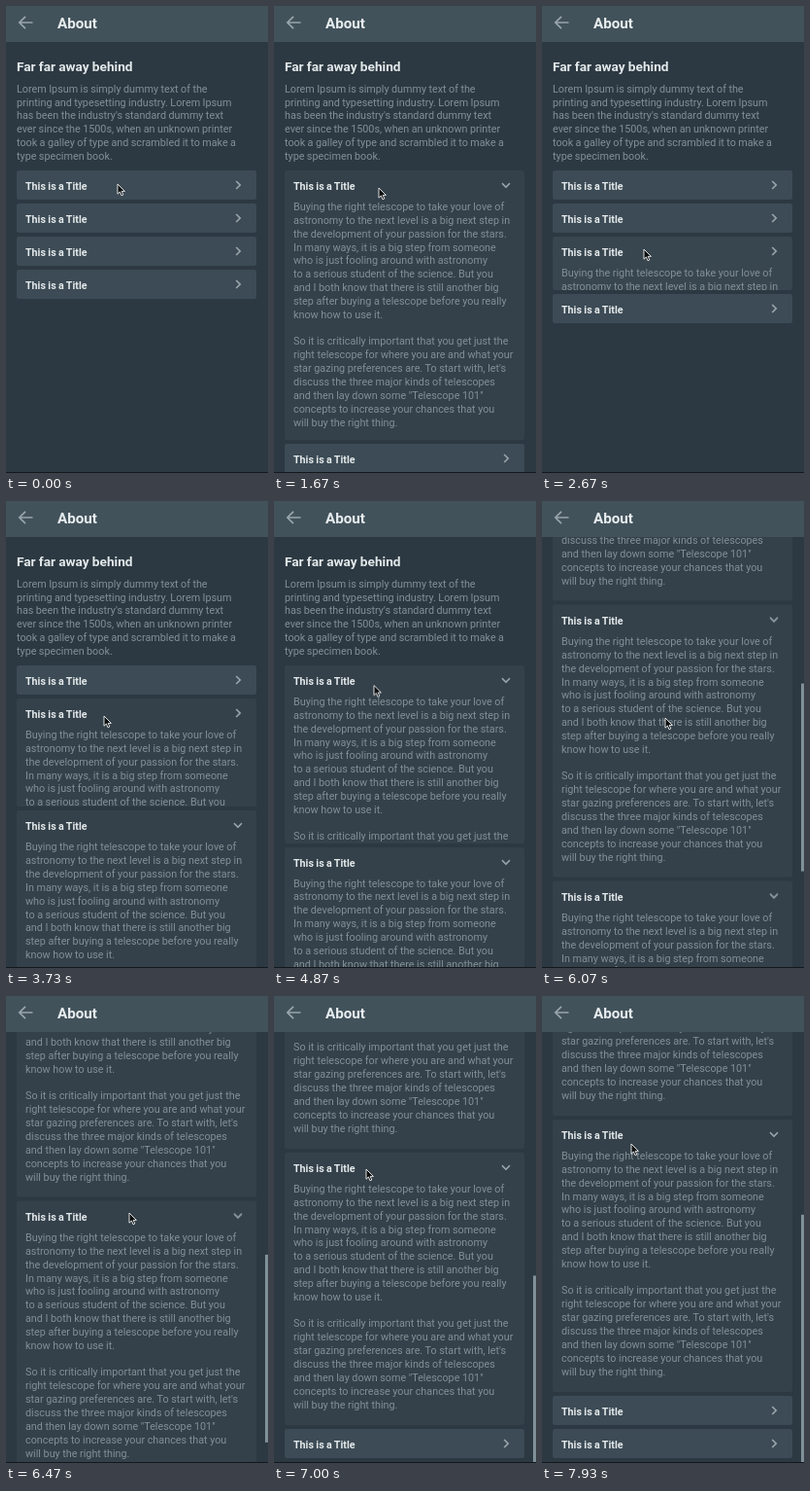
An HTML page for the animation above (8000 ms loop, 270x480 px).

```html
<!DOCTYPE html>
<html lang="en">
<head>
<meta charset="utf-8">
<title>About</title>
<style>
  html, body { margin: 0; width: 100%; height: 100%; overflow: hidden; background: #2d3942; }
  #stage {
    position: relative; width: 270px; height: 480px; overflow: hidden;
    background: #2d3942; color: #828f96;
    font: 10.8px/13.84px Roboto, sans-serif; word-spacing: -.27px;
  }
  #stage * { box-sizing: border-box; }
  header { position: absolute; inset: 0 0 auto; height: 37px; background: #42525b; }
  header svg { position: absolute; left: 12px; top: 9px; }
  h1, h2, h3, p { margin: 0; white-space: pre; }
  h1 { position: absolute; left: 53px; top: 8px; font: 700 15.2px/20px Roboto, sans-serif; color: #e8edef; }
  main { position: absolute; inset: 37px 0 0; overflow: hidden; }
  #page { position: absolute; inset: 0 0 auto; }
  h2 { position: absolute; left: 11px; top: 15px; font: 600 13.7px/20px Roboto, sans-serif; color: #e2e8ea; }
  #intro { position: absolute; left: 11px; top: 41.7px; }
  #list { position: absolute; left: 11px; top: 132px; width: 247px; }
  .card { position: relative; margin-bottom: 4px; border-radius: 2px; overflow: hidden; background: #3c4b55; }
  .card h3 { height: 30px; padding-left: 9px; font: 600 10.7px/33px Roboto, sans-serif; color: #e4e9eb; }
  .card svg { position: absolute; left: 222px; top: 9px; }
  .body { height: 0; overflow: hidden; word-spacing: -.1px; }
  .body p { padding: 1px 0 0 9px; }
  svg { display: block; fill: none; stroke: #98a5ab; stroke-width: 1.7; }
  #thumb { position: absolute; right: 0; top: 0; width: 3px; background: #7f9098; opacity: 0; }
  #edge { position: absolute; inset: 479px 0 0; background: #12181c; }
  #cursor { position: absolute; left: -1px; top: -1px; fill: #0b0d0e; stroke: #f4f4f4; stroke-width: .9; }
</style>
</head>
<body>
<div id="stage">
  <main>
    <div id="page">
      <h2>Far far away behind</h2>
      <p id="intro">Lorem Ipsum is simply dummy text of the
printing and typesetting industry. Lorem Ipsum
has been the industry's standard dummy text
ever since the 1500s, when an unknown printer
took a galley of type and scrambled it to make a
type specimen book.</p>
      <div id="list"></div>
    </div>
    <div id="thumb"></div>
  </main>
  <header>
    <svg width="16" height="16"><path d="M15.5 8H2M8 1.8 1.8 8 8 14.2"/></svg>
    <h1>About</h1>
  </header>
  <div id="edge"></div>
  <svg id="cursor" width="12" height="16"><path d="M1 1V11.2L3.4 9 5 12.8 6.8 12 5.2 8.4H8.4Z"/></svg>
</div>
<script>
const LOOP = 8000, SLIDE = 300, BODY = 250, VIEW = 443, FULL = 1019;
const CLOSED = '#3c4b55', OPEN = '#34414a';
const $ = id => document.getElementById(id);

const copy = `Buying the right telescope to take your love of
astronomy to the next level is a big next step in
the development of your passion for the stars.
In many ways, it is a big step from someone
who is just fooling around with astronomy
to a serious student of the science. But you
and I both know that there is still another big
step after buying a telescope before you really
know how to use it.

So it is critically important that you get just the
right telescope for where you are and what your
star gazing preferences are. To start with, let's
discuss the three major kinds of telescopes
and then lay down some "Telescope 101"
concepts to increase your chances that you
will buy the right thing.`;

// Steps are [ms, properties, easing to the next step].
function play(el, steps) {
  const all = [[0, steps[0][1]], ...steps, [LOOP, steps[steps.length - 1][1]]];
  const frames = all.map(([ms, props, easing = 'linear']) => ({ ...props, offset: ms / LOOP, easing }));
  const anim = el.animate(frames, { duration: LOOP, iterations: Infinity });
  anim.startTime = document.timeline.currentTime;
}

// Click times per card; each click toggles it.
const clicks = [[640, 1664, 4765], [3667], [2640, 7300], []];

clicks.forEach(times => {
  const card = document.createElement('div');
  card.className = 'card';
  card.innerHTML = `<h3>This is a Title</h3>
    <svg width="12" height="12"><path d="M4.2 2 8.2 6 4.2 10"/></svg>
    <div class="body"><p>${copy}</p></div>`;
  $('list').append(card);
  if (!times.length) return;

  const size = [], tint = [], turn = [];
  times.forEach((t, i) => {
    const from = i % 2, to = 1 - from;
    const height = on => ({ height: on * BODY + 'px' });
    const color = on => ({ backgroundColor: on ? OPEN : CLOSED });
    const angle = on => ({ transform: `rotate(${on * 90}deg)` });
    size.push([t, height(from), 'ease'], [t + SLIDE, height(to)]);
    tint.push([t + from * 150, color(from)], [t + 60 + from * 200, color(to)]);
    turn.push([t + 95, angle(from)], [t + 95, angle(to)]);
  });
  play(card.querySelector('.body'), size);
  play(card, tint);
  play(card.querySelector('svg'), turn);
});

// Scroll offsets [ms, y, content height, easing].
const scroll = [
  [5110, 0, FULL, 'ease-in'], [5310, 92, FULL], [5470, 211, FULL], [5600, 264, FULL, 'ease-out'],
  [5860, 292, FULL, 'ease-in'], [6070, 346, FULL], [6270, 435, FULL], [6470, 526, FULL, 'ease-out'],
  [6670, 576, FULL], [7300, 576, FULL, 'ease'], [7600, 326, FULL - BODY]
];
play($('page'), scroll.map(([t, y, , e]) => [t, { transform: `translateY(${-y}px)` }, e]));
play($('thumb'), scroll.map(([t, y, h, e]) => [t, {
  transform: `translateY(${y * VIEW / h}px)`, height: VIEW * VIEW / h + 'px'
}, e]));
play($('thumb'), [[5110, { opacity: 0 }], [5190, { opacity: 1 }]]);

const path = [
  [100, 115, 183], [130, 116, 183], [240, 116, 183], [400, 108, 187],
  [1860, 108, 187], [2270, 105, 250], [2900, 105, 250], [3270, 101, 221],
  [3950, 101, 221], [4270, 103, 190], [4460, 103, 190], [4530, 103, 189.5],
  [4900, 103, 189.5], [5200, 134, 210], [5500, 133, 210], [6070, 127, 223],
  [6650, 127, 223], [7000, 95, 178], [7560, 95, 178], [7930, 92, 152]
];
play($('cursor'), path.map(([t, x, y]) => [t, { transform: `translate(${x}px, ${y}px)` }, 'ease-in-out']));
</script>
</body>
</html>
```
